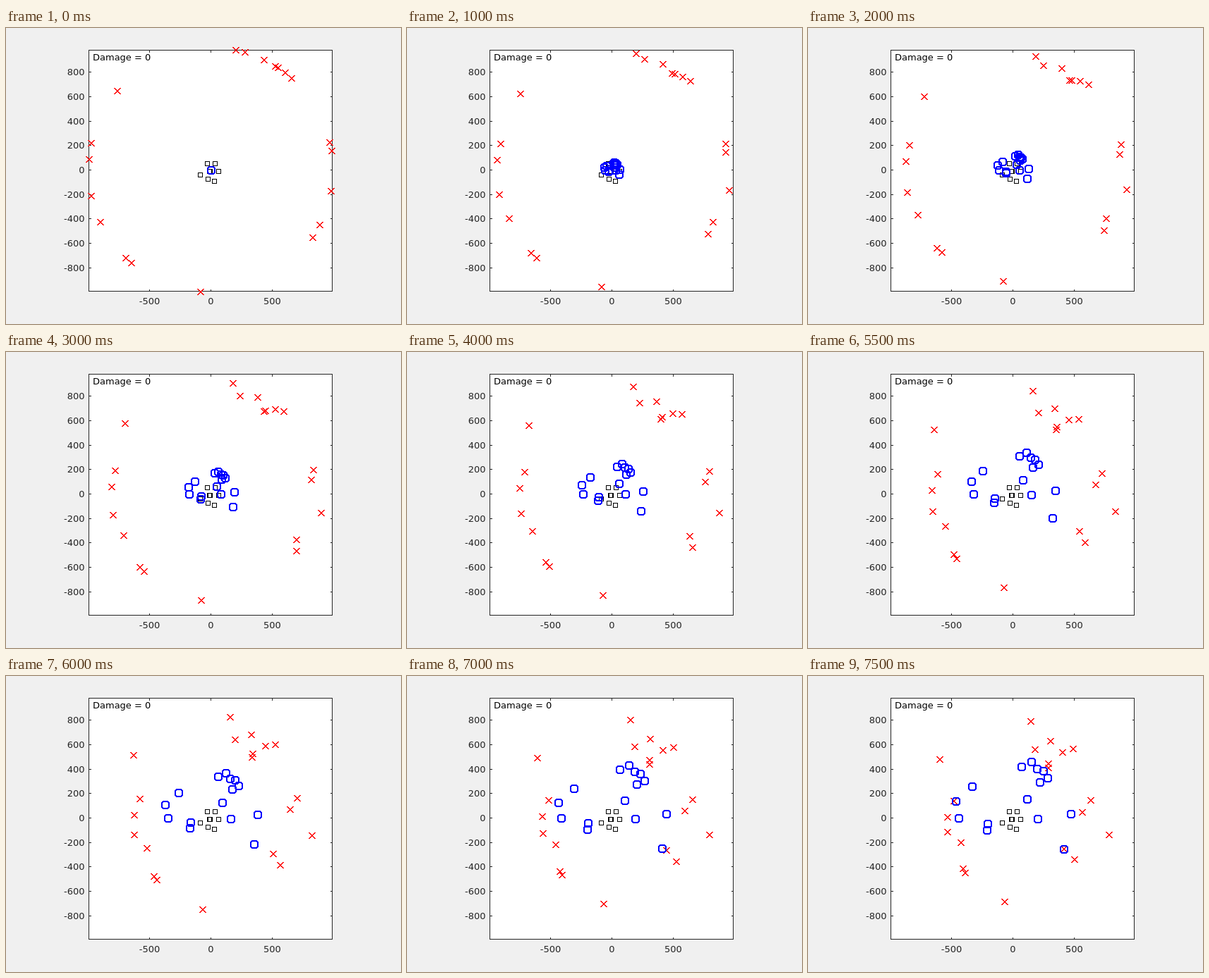
These frames come from a looping animation (560 by 420 pixels, 8000 ms). An HTML page:

```html
<!DOCTYPE html>
<html lang="en">
<head>
<meta charset="utf-8">
<title>Damage plot</title>
<style>
  html, body { margin: 0; width: 100%; height: 100%; overflow: hidden; background: #f0f0f0; }
  svg { display: block; width: 560px; height: 420px; }
  text { font: 13px "DejaVu Sans", sans-serif; fill: #262626; }
  path, rect { fill: none; shape-rendering: crispEdges; }
  .axes { stroke: #262626; }
  .base { stroke: #000; }
  .attacker { stroke: #f00; }
  .defender { stroke: #00f; stroke-width: 2; }
</style>
</head>
<body>
<svg id="plot" viewBox="0 0 560 420"></svg>
<script>
const STEP = 500, STEPS = 16;
const LEFT = 117.5, TOP = 31.5, RIGHT = 462.5, BOTTOM = 373.5, TICK = 3;
const CENTRE = { x: 290.5, y: 201.5 }, RADIUS = 173.5;
const HOME = { x: 291, y: 201.6 };
const CROSS = "M-4.6-4.6L4.6 4.6M4.6-4.6L-4.6 4.6";
const RING = "M-3-5H3L5-3V3L3 5H-3L-5 3V-3Z";

const bases = [[285, 192], [296, 192], [301, 203], [275, 208], [286, 214], [295, 217], [288, 203], [289, 203]]
  .map(([x, y]) => ({ x, y }));

// Each attacker leaves the circle for one base:
// bearing in degrees, pixels per step, base, step at which a defender meets it
const raids = [
  [9, 5.03, 5, 16.5], [13.1, 3.98, 6], [48.5, 2.88, 1, 22], [52.7, 3.76, 6, 29],
  [56.7, 5.43, 6, 16.2], [58.2, 5.81, 5, 17.3], [64.2, 3.5, 4, 20], [73.8, 4.79, 5, 16.7],
  [78.2, 2.3, 3, 24], [140, 2.69, 4, 23], [167.2, 5.77, 1, 15.3], [174.9, 5.41, 5, 16.6],
  [192.2, 5.24, 6, 22.6], [205.4, 6.14, 6, 19.6], [225.9, 4.86, 6], [229.4, 4.73, 6],
  [265.2, 3.61, 4], [326.4, 4.53, 6], [333.2, 5.95, 4, 14.57], [350.2, 2.36, 6]
];

// Straight run at constant speed; returns position as a function of the step
function run(from, to, speed) {
  const angle = Math.atan2(to.y - from.y, to.x - from.x);
  return step => ({
    x: from.x + Math.cos(angle) * speed * step,
    y: from.y + Math.sin(angle) * speed * step
  });
}

function attack([bearing, speed, base]) {
  const a = bearing * Math.PI / 180;
  const start = { x: CENTRE.x + RADIUS * Math.cos(a), y: CENTRE.y - RADIUS * Math.sin(a) };
  return run(start, bases[base], speed);
}

// Head for the meeting point, then stay on the attacker
function intercept(prey, meet) {
  const goal = prey(meet);
  const chase = run(HOME, goal, Math.hypot(goal.x - HOME.x, goal.y - HOME.y) / meet);
  return step => step < meet ? chase(step) : prey(step);
}

const attackers = raids.map(attack);
const defenders = attackers.flatMap((prey, i) => raids[i][3] ? [intercept(prey, raids[i][3])] : []);
const patrol = run(HOME, { x: RIGHT, y: 209 }, 2.33);
defenders.push(patrol);

const plot = document.getElementById("plot");

function add(tag, attrs, text = "") {
  const el = document.createElementNS("http://www.w3.org/2000/svg", tag);
  for (const key in attrs) el.setAttribute(key, attrs[key]);
  el.textContent = text;
  return plot.appendChild(el);
}

function label(x, y, anchor, text) {
  add("text", { x, y, "text-anchor": anchor }, text);
}

function drawAxes() {
  add("rect", { class: "axes", x: LEFT, y: TOP, width: RIGHT - LEFT, height: BOTTOM - TOP, style: "fill:#fff" });
  let ticks = "";
  for (let v = -500; v <= 500; v += 500) {
    const x = Math.round(290 + v * 0.1735) + 0.5;
    ticks += `M${x} ${BOTTOM}v${-TICK}M${x} ${TOP}v${TICK}`;
    label(x, 392, "middle", v);
  }
  for (let v = -800; v <= 800; v += 200) {
    const y = Math.round(201 - v * 0.1735) + 0.5;
    ticks += `M${LEFT} ${y}h${TICK}M${RIGHT} ${y}h${-TICK}`;
    label(111.5, y + 4.5, "end", v);
  }
  add("path", { class: "axes", d: ticks });
  add("text", { x: 123, y: 46, style: "fill:#000" }, "Damage = 0");
}

drawAxes();
for (const { x, y } of bases) add("rect", { class: "base", x: x - 2.5, y: y - 2.5, width: 6, height: 6 });

const makeMarks = (routes, name, d, shift) =>
  routes.map(at => ({ at, shift, el: add("path", { class: name, d }) }));
const marks = [
  ...makeMarks(attackers, "attacker", CROSS, 0.5),
  ...makeMarks(defenders, "defender", RING, 0)
];

function show(step) {
  for (const { at, shift, el } of marks) {
    const { x, y } = at(step);
    el.setAttribute("transform", `translate(${Math.round(x)} ${Math.round(y - shift) + shift})`);
  }
}

const begin = performance.now();
function tick(now) {
  const time = Math.max(0, now - begin);
  show(Math.floor(time / STEP) % STEPS);
  requestAnimationFrame(tick);
}
show(0);
requestAnimationFrame(tick);
</script>
</body>
</html>
```
